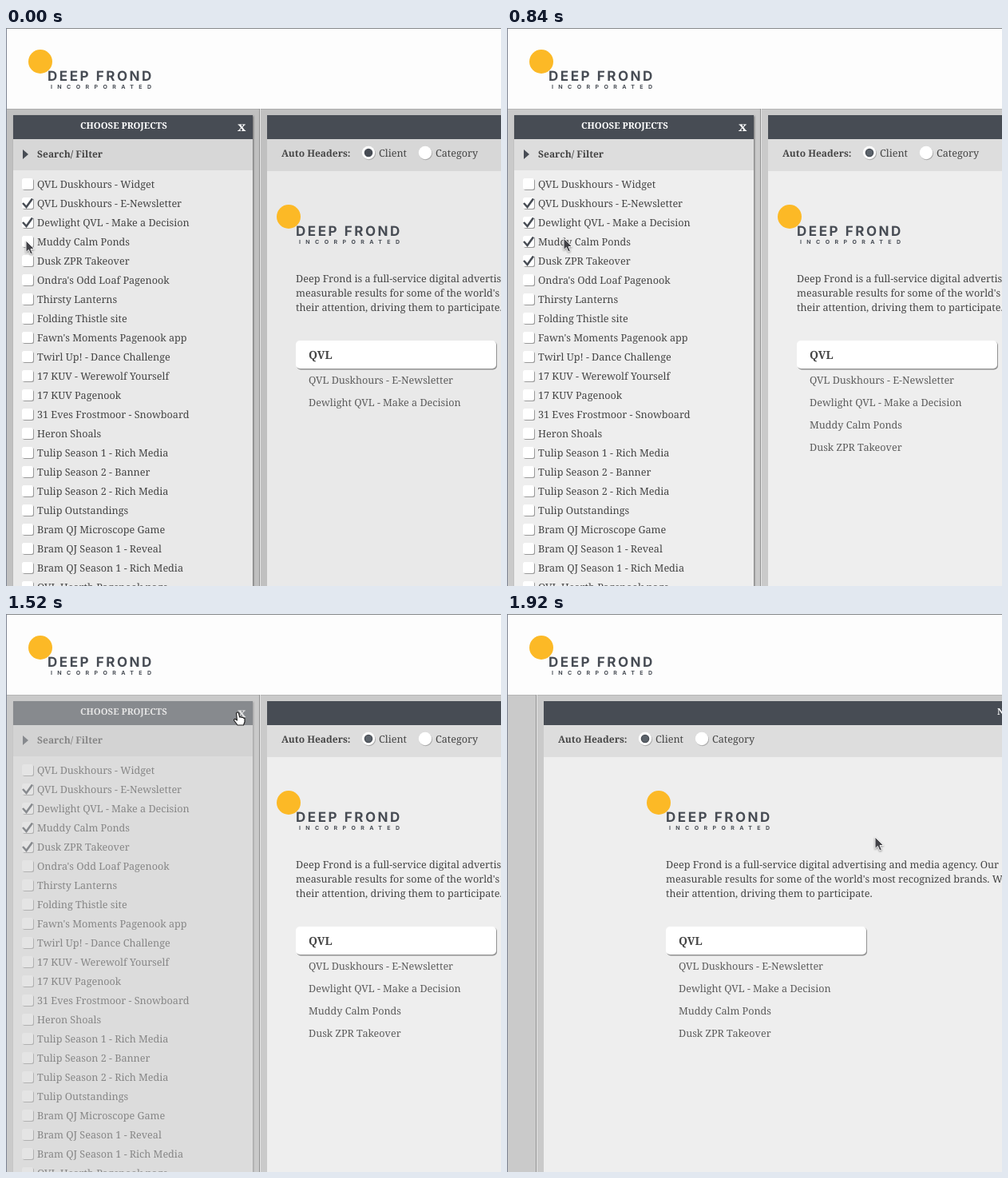
Recreate the animation shown at these times as an HTML page. Size 620x698 px, loop 1.96 s.

```html
<!DOCTYPE html>
<html lang="en">
<head>
<meta charset="utf-8">
<title>Choose projects</title>
<style>
  html, body { margin: 0; width: 100%; height: 100%; overflow: hidden; }
  svg {
    --gutter: #cacaca; --body: #eeeeee; --bar: #dddddd; --dark: #474c54; --dot: #5c636b;
    display: block; width: 620px; height: 698px;
    font: 12.6px "Noto Serif", serif; fill: #454545;
    text-rendering: geometricPrecision;
  }
  svg.dim { --gutter: #c0c0c0; --body: #e9e9e9; --bar: #d7d7d7; --dot: #474c54; }
  .gutter { fill: var(--gutter); }
  .body { fill: var(--body); }
  .bar { fill: var(--bar); }
  .dark { fill: var(--dark); }
  .dot { fill: var(--dot); stroke: var(--dark); stroke-width: 1.4; }
  .bold { font-size: 12px; font-weight: 600; }
  .title { font-size: 11.3px; font-weight: 600; fill: #fff; }
  .client { font-size: 14px; font-weight: 600; }
  .entry { fill: #5c5c5c; }
  .brand { font: 700 17px Inter, sans-serif; letter-spacing: 2.55px; fill: var(--dark); }
  .tag { font: 700 7px Inter, sans-serif; letter-spacing: 6.4px; fill: var(--dark); }
  .tick { fill: none; stroke: var(--dark); stroke-width: 2.6; }
  .sheet { filter: drop-shadow(1px 1px 1px #0007); }
</style>
</head>
<body>
<svg id="stage" viewBox="0 0 620 698">
  <defs>
    <g id="logo">
      <circle r="15" fill="#fcb926"/>
      <text class="brand" x="9" y="24">DEEP FROND</text>
      <text class="tag" x="13" y="34">INCORPORATED</text>
    </g>
    <g id="box">
      <rect x="1" y="1" width="14" height="14" rx="2.5" fill="#999"/>
      <rect width="14" height="14" rx="2.5" fill="#fff"/>
    </g>
    <g id="radio">
      <circle cx=".7" cy="1" r="8.3" fill="#aaa"/>
      <circle r="8.2" fill="#fff"/>
    </g>
  </defs>

  <rect class="gutter" width="620" height="698"/>
  <rect y="101" width="620" height="1" fill="#000" opacity=".1"/>

  <g id="picker">
    <rect class="body sheet" x="9" y="109" width="300" height="600"/>
    <rect class="bar" x="9" y="139" width="300" height="39"/>
    <rect class="dark" x="9" y="109" width="300" height="30"/>
    <text class="title" x="93" y="126">CHOOSE PROJECTS</text>
    <text x="290" y="129" font-size="16" font-weight="700" fill="#fff">x</text>
    <path class="dark" d="M21 152l7 6-7 6z"/>
    <text class="bold" x="39" y="162">Search/ Filter</text>
    <g id="rows"></g>
  </g>

  <g id="panel">
    <rect x="-10" y="101" width="1" height="600" fill="#929292"/>
    <rect x="-9" y="101" width="1" height="600" fill="#e6e6e6"/>
    <rect class="body" y="109" width="640" height="590"/>
    <rect class="bar" y="139" width="640" height="40"/>
    <rect class="dark" y="109" width="640" height="30"/>
    <text class="title" x="568" y="126">N</text>
    <text class="bold" x="18" y="161">Auto Headers:</text>
    <use href="#radio" x="127" y="156"/>
    <circle class="dot" cx="127" cy="156" r="4.6"/>
    <text x="140" y="161">Client</text>
    <use href="#radio" x="198" y="156"/>
    <text x="211" y="161">Category</text>
  </g>

  <g id="content">
    <use href="#logo" x="-9" y="236"/>
    <text y="318">Deep Frond is a full-service digital advertising and media agency. Our</text>
    <text y="336">measurable results for some of the world's most recognized brands. We</text>
    <text y="354">their attention, driving them to participate.</text>
    <rect x="1" y="392" width="251" height="35.5" rx="5" fill="#929292"/>
    <rect y="391" width="251" height="35" rx="5" fill="#fff"/>
    <text class="client" x="16" y="414">QVL</text>
    <g id="entries"></g>
  </g>

  <rect width="620" height="101" fill="#fdfdfd"/>
  <rect width="620" height="1" fill="#85878a"/>
  <rect width="1" height="698" fill="#7d8492"/>
  <use href="#logo" x="43" y="42"/>

  <g id="cursor">
    <path id="arrow" d="M0 0V14.5L3.4 11.4L5.8 17L8.4 15.9L6 10.5H10.6Z"
      fill="#414146" stroke="#f4f4f4" stroke-width="1"
      style="filter:drop-shadow(0 1px 1px #0006)"/>
    <path id="hand" d="M-1.5 0Q0-2 1.5 0L2.6 5L4 4.6L5 5.4L6.5 5.2L7.5 6.2L9 6.6V11L7.5 15H0L-4.5 9Q-4.5 7 -2.6 7.6L-.6 9Z"
      fill="#fff" stroke="#222" stroke-width="1.2" stroke-linejoin="round"/>
  </g>
</svg>

<script>
const LOOP = 1960, TICK = 40;
const $ = id => document.getElementById(id);

const projects = [
  'QVL Duskhours - Widget', 'QVL Duskhours - E-Newsletter',
  'Dewlight QVL - Make a Decision', 'Muddy Calm Ponds', 'Dusk ZPR Takeover',
  "Ondra's Odd Loaf Pagenook", 'Thirsty Lanterns', 'Folding Thistle site',
  "Fawn's Moments Pagenook app", 'Twirl Up! - Dance Challenge',
  '17 KUV - Werewolf Yourself', '17 KUV Pagenook',
  '31 Eves Frostmoor - Snowboard', 'Heron Shoals',
  'Tulip Season 1 - Rich Media', 'Tulip Season 2 - Banner',
  'Tulip Season 2 - Rich Media', 'Tulip Outstandings',
  'Bram QJ Microscope Game', 'Bram QJ Season 1 - Reveal',
  'Bram QJ Season 1 - Rich Media', 'QVL Hearth Pagenook page'
];
// Project index -> time it gets ticked
const ticked = { 1: 0, 2: 0, 3: 160, 4: 680 };

$('rows').innerHTML = projects.map((name, i) => {
  const y = 188 + 24 * i;
  const tick = i in ticked
    ? `<path class="tick" data-at="${ticked[i]}" d="M21 ${y + 7}l4.5 5 7.5-10.5"/>` : '';
  return `<use href="#box" x="20" y="${y}"/>${tick}<text x="39" y="${y + 12}">${name}</text>`;
}).join('');

$('entries').innerHTML = Object.entries(ticked).map(([i, at], n) =>
  `<text class="entry" data-at="${at}" x="16" y="${445 + 28 * n}">${projects[i]}</text>`
).join('');

const timed = [...document.querySelectorAll('[data-at]')];

// Each key: [time, ...values]
const pointer = [
  [0, 25, 266], [240, 25, 267], [480, 27, 288], [720, 27, 289], [800, 40, 282],
  [960, 165, 205], [1080, 268, 136], [1160, 284, 124], [1240, 290, 123],
  [1600, 290, 124], [1680, 291, 130], [1760, 302, 154], [1840, 372, 212], [1920, 461, 279]
];
const slide = [
  [1600, 327], [1640, 288], [1680, 235], [1760, 148],
  [1800, 114], [1840, 86], [1880, 64], [1920, 46]
];
const fade = [[1440, 1], [1600, 0]];

function sample(keys, t) {
  const next = keys.findIndex(k => k[0] > t);
  if (next === 0) return keys[0].slice(1);
  if (next < 0) return keys[keys.length - 1].slice(1);
  const a = keys[next - 1], b = keys[next];
  const u = (t - a[0]) / (b[0] - a[0]);
  return a.slice(1).map((v, i) => v + (b[i + 1] - v) * u);
}

const move = (id, x, y = 0) => $(id).setAttribute('transform', `translate(${x} ${y})`);
const show = (el, on) => { el.style.display = on ? '' : 'none'; };

function draw(now) {
  const t = Math.floor((now % LOOP) / TICK) * TICK;
  const [left] = sample(slide, t);
  const [x, y] = sample(pointer, t);
  const hand = t >= 1240 && t < 1640;

  $('stage').classList.toggle('dim', t < TICK);
  move('panel', Math.round(left));
  // Content is centred, but keeps a minimum left margin
  move('content', Math.round(Math.max(left + 36, left / 2 + 175.7)));
  move('cursor', Math.round(x), Math.round(y));
  show($('hand'), hand);
  show($('arrow'), !hand);
  $('picker').style.opacity = sample(fade, t)[0];
  timed.forEach(el => show(el, t >= +el.dataset.at));
}

const start = performance.now();
function loop() {
  draw(performance.now() - start);
  requestAnimationFrame(loop);
}
loop();
</script>
</body>
</html>
```
